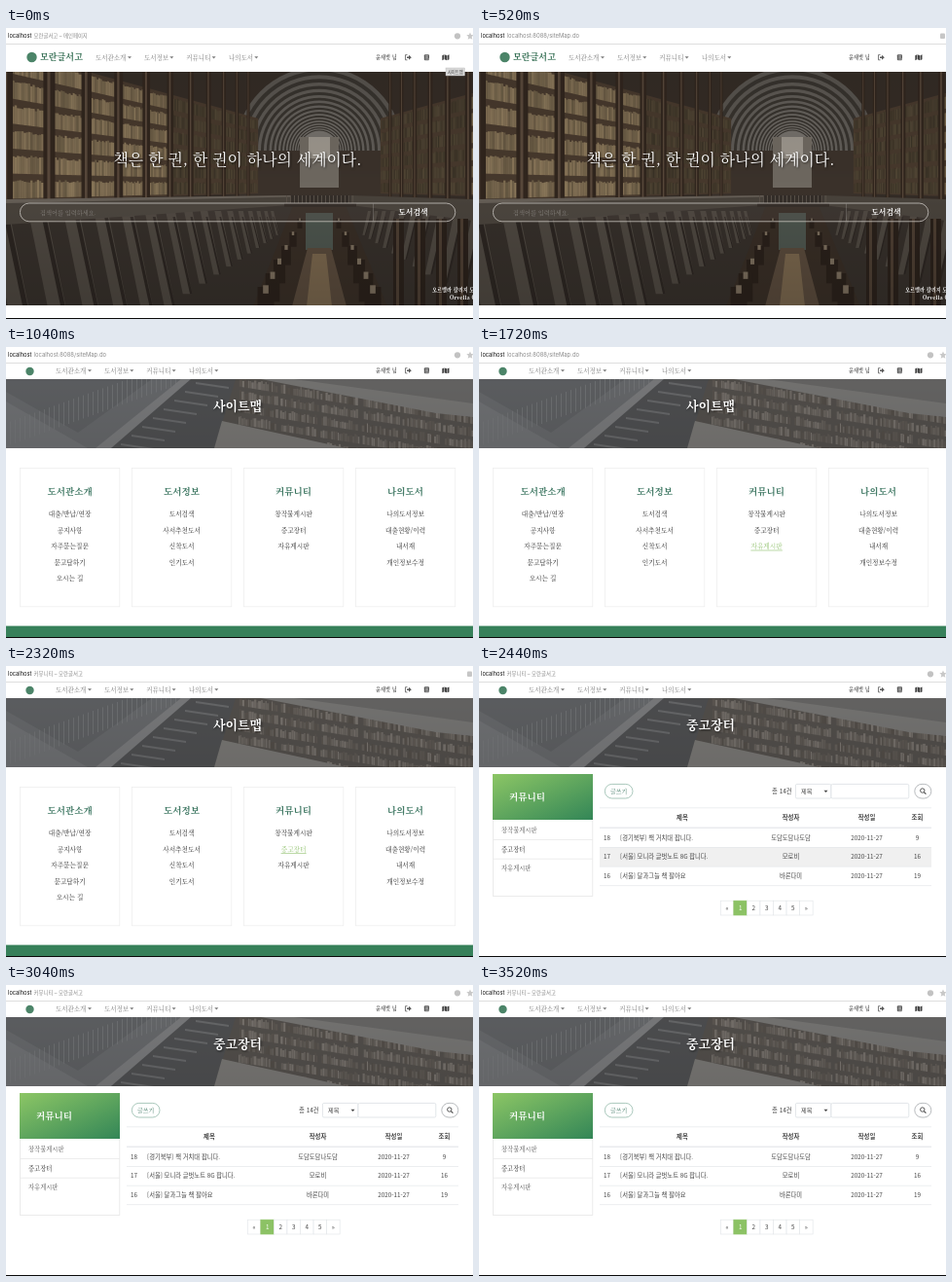
Recreate the animation shown at these times as an HTML page with a canvas. Size 480 px wide and 299 px high, loop 3640 ms.

```html
<!DOCTYPE html>
<html lang="ko">
<head>
<meta charset="utf-8">
<title>모란글서고</title>
<style>
html, body { margin: 0; width: 100%; height: 100%; overflow: hidden; background: #fff; }
#stage { position: absolute; left: 0; top: 0; width: 480px; height: 299px; overflow: hidden; background: #fff; }
#stage > * { position: absolute; left: 0; }
#hall { top: 45px; width: 480px; height: 240px; }
#hero { top: 33px; width: 480px; height: 71px; background: #606060; }
#stair { top: 33px; width: 480px; height: 71px; }
svg { top: 0; }
text { font-family: 'Noto Serif CJK KR', 'Noto Serif KR', 'Noto Serif', 'Noto Sans CJK KR', serif; fill: #2b2b2b; }
.sans { font-family: 'Noto Sans CJK KR', 'Noto Sans', sans-serif; fill: #444; }
.bar { font-family: Inter, 'Noto Sans CJK KR', sans-serif; fill: #8a8a8a; }
.host { fill: #111; }
.nav { fill: #7d7d7d; }
.name { fill: #555; }
.brand { fill: #2f6b4f; font-weight: 700; }
.white { fill: #fff; }
.big { fill: #fff; filter: drop-shadow(1px 1px 1px rgba(0, 0, 0, .6)); }
.bold { font-weight: 700; }
.mid { font-weight: 600; }
.hint { fill: #85827d; }
.green { fill: #3b7560; }
.item { fill: currentColor; }
.on { color: #2b2b2b; stroke-opacity: 0; }

/* hard switches between states */
.sw { animation: 3640ms step-end infinite; }
#hall, .home { animation-name: home; }
#hero, .inner { animation-name: inner; }
#stair { animation-name: photo; }
.map { animation-name: map; }
.board { animation-name: board; }
.url1 { animation-name: url1; }
.url2 { animation-name: url2; }
.url3 { animation-name: url3; }
.idle { animation-name: idle; }
.busy { animation-name: busy; }
.row { animation-name: row; }
.h0 { animation-name: h0; }
.h1 { animation-name: h1; }
.h2 { animation-name: h2; }
.tip { animation: tip 3640ms linear infinite; }

@keyframes home { 0% { opacity: 1 } 15.38%, 100% { opacity: 0 } }
@keyframes inner { 0% { opacity: 0 } 15.38%, 100% { opacity: 1 } }
@keyframes photo { 0% { opacity: 0 } 17.58%, 100% { opacity: 1 } }
@keyframes map { 0% { opacity: 0 } 15.38% { opacity: 1 } 67.03%, 100% { opacity: 0 } }
@keyframes board { 0% { opacity: 0 } 67.03%, 100% { opacity: 1 } }
@keyframes url1 { 0% { opacity: 1 } 12.08%, 100% { opacity: 0 } }
@keyframes url2 { 0% { opacity: 0 } 12.08% { opacity: 1 } 63.73%, 100% { opacity: 0 } }
@keyframes url3 { 0% { opacity: 0 } 63.73%, 100% { opacity: 1 } }
@keyframes idle { 0% { opacity: 1 } 12.08% { opacity: 0 } 15.38% { opacity: 1 } 63.73% { opacity: 0 } 67.03%, 100% { opacity: 1 } }
@keyframes busy { 0% { opacity: 0 } 12.08% { opacity: 1 } 15.38% { opacity: 0 } 63.73% { opacity: 1 } 67.03%, 100% { opacity: 0 } }
@keyframes row { 0% { opacity: 0 } 67.03% { opacity: 1 } 70.32%, 100% { opacity: 0 } }
@keyframes tip { 0%, 1.1% { opacity: 1 } 6.6%, 100% { opacity: 0 } }
@keyframes h0 {
  0% { color: #2b2b2b; stroke-opacity: 0 }
  25.27% { color: #8fc06c; stroke-opacity: 1 }
  26.37%, 100% { color: #2b2b2b; stroke-opacity: 0 }
}
@keyframes h1 {
  0% { color: #2b2b2b; stroke-opacity: 0 }
  26.37% { color: #8fc06c; stroke-opacity: 1 }
  27.47% { color: #2b2b2b; stroke-opacity: 0 }
  49.45%, 100% { color: #8fc06c; stroke-opacity: 1 }
}
@keyframes h2 {
  0% { color: #2b2b2b; stroke-opacity: 0 }
  27.47% { color: #8fc06c; stroke-opacity: 1 }
  28.57% { color: #2b2b2b; stroke-opacity: 0 }
  47.25% { color: #8fc06c; stroke-opacity: 1 }
  49.45%, 100% { color: #2b2b2b; stroke-opacity: 0 }
}
</style>
</head>
<body>
<div id="stage">
  <canvas id="hall" class="sw" width="960" height="480"></canvas>
  <div id="hero" class="sw"></div>
  <canvas id="stair" class="sw" width="960" height="142"></canvas>
  <svg id="ui" width="480" height="299" viewBox="0 0 480 299">
    <defs>
      <linearGradient id="leaf" x1="0" y1="0" x2="1" y2="1">
        <stop offset="0" stop-color="#8cc665"/><stop offset="1" stop-color="#338657"/>
      </linearGradient>
    </defs>
  </svg>
</div>
<script>
const ui = document.getElementById('ui');

function el(parent, tag, attrs, txt) {
  const e = document.createElementNS('http://www.w3.org/2000/svg', tag);
  for (const k in attrs) e.setAttribute(k, attrs[k]);
  if (txt) e.textContent = txt;
  return parent.appendChild(e);
}
const group = (cls, parent = ui) => el(parent, 'g', { class: cls });
const rect = (g, x, y, width, height, fill, more) => el(g, 'rect', { x, y, width, height, fill, ...more });
const path = (g, d, fill, more) => el(g, 'path', { d, fill, ...more });
// y is the middle of the line
const text = (g, x, y, s, size, cls = '', anchor = 'start') =>
  el(g, 'text', { x, y: y + size * .37, 'font-size': size, class: cls, 'text-anchor': anchor }, s);
const mid = (g, x, y, s, size, cls) => text(g, x, y, s, size, cls, 'middle');
const caret = (g, x, y, fill) => path(g, `M${x - 2} ${y - 1}h4l-2 2.2z`, fill);

function rng(seed) {
  return () => (seed = (seed * 16807) % 2147483647) / 2147483647;
}

function pen(id, top) {
  const c = document.getElementById(id).getContext('2d');
  c.scale(2, 2);
  c.translate(0, -top);
  return (fill, ...pts) => {
    c.fillStyle = fill;
    c.beginPath();
    for (let i = 0; i < pts.length; i += 2) c.lineTo(pts[i], pts[i + 1]);
    c.fill();
    return c;
  };
}

function drawHall() {
  const poly = pen('hall', 45), rand = rng(7), vx = 322;
  const box = (f, x, y, w, h) => poly(f, x, y, x + w, y, x + w, y + h, x, y + h);
  const c = box('#332b25', 0, 45, 480, 240);

  // vault: pale ribs on dark, closing in on the far window
  for (let r = 86, i = 0; r > 20; r *= .95, i++) {
    const v = i % 2 ? 50 : 82 + i;
    c.fillStyle = `rgb(${v + 4},${v},${v - 5})`;
    c.beginPath();
    c.arc(vx, 126, r, Math.PI, 0);
    c.fill();
  }
  box('#3a312a', 240, 126, 164, 50);
  box('#6d675f', 302, 112, 40, 52);
  box('#99938a', 311, 112, 22, 22);

  // receding bookcases on both sides
  const topAt = k => 110 - 88 * k, lowAt = k => 168 + 10 * k;
  for (const side of [-1, 1]) {
    const px = k => vx + side * 322 * k;
    for (let k = 1; k > .2; k *= .862) {
      const k2 = k * .862;
      poly('#46382c', px(k), topAt(k), px(k2), topAt(k2), px(k2), lowAt(k2), px(k), lowAt(k));
      for (let b = k - .02 * k; b > k2 + .015 * k;) {
        const e = b - .006 * b - .0015;
        for (let n = 0; n < 6; n++) {
          const y = q => topAt(q) + (lowAt(q) - topAt(q)) * n / 6;
          const h = (lowAt(b) - topAt(b)) / 6;
          const lit = (k > .55 ? .95 : .55) * (.8 + rand() * .3);
          const gap = h * (.14 + rand() * .12);
          poly(`rgb(${132 * lit},${114 * lit},${86 * lit})`,
            px(b), y(b) + gap, px(e), y(e) + gap, px(e), y(e) + h * .9, px(b), y(b) + h * .9);
        }
        b = e;
      }
      const w = 14 * k;
      box('#30251d', px(k) - w / 2, 45, w, lowAt(k) - 37);
      box('#57473a', px(k) - w / 6, 45, w / 4, lowAt(k) - 40);
    }
  }

  // lower storey, balusters and aisle
  poly('#342e29', 0, 178, 296, 172, 348, 172, 480, 178, 480, 286, 0, 286);
  for (let k = 1.2; k > .14; k *= .88)
    for (const side of [-1, 1]) {
      const x = vx + side * 322 * k, w = 20 * k, low = 185 + 180 * k, lean = -side * 36 * k;
      poly('#4c463f', x, 188, x + w, 188, x + w + lean, low, x + lean, low);
      poly('#2a2420', x + w * .75, 194, x + w, 194, x + w + lean, low, x + w * .75 + lean, low);
    }
  poly('#48423b', 0, 176, 292, 172, 292, 182, 0, 202);
  poly('#655e56', 0, 176, 292, 172, 292, 173.5, 0, 180);
  poly('#48423b', 480, 176, 354, 172, 354, 182, 480, 198);
  poly('#362c24', 296, 180, 348, 180, 392, 286, 254, 286);
  box('#4b534c', 308, 190, 28, 38);
  poly('#57483a', 310, 226, 334, 226, 350, 286, 294, 286);
  poly('#77644b', 315, 232, 329, 232, 335, 286, 309, 286);
  for (let i = 0; i < 6; i++) {
    const s = 5 + i * 2.4, y = 196 + i * 14;
    for (const side of [-1, 1]) {
      const x = vx + side * (20 + i * 7);
      box('#281f19', x - s / 2, y, s, s * 2);
      box('#7a6d5c', x - s / 6, y - s * .1, s / 3, s / 2);
    }
  }
  box('#2c2520', 286, 180, 74, 4);
  for (let x = 288; x < 360; x += 4) box('#574f47', x, 172, 1, 8);
  for (let x = 398; x < 480; x += 22) {
    box('#281f19', x, 196, 11, 90);
    box('#4b3d31', x + 3, 196, 3, 90);
  }
  const g = c.createLinearGradient(0, 45, 0, 286);
  g.addColorStop(0, 'rgba(20,18,16,.08)');
  g.addColorStop(.5, 'rgba(20,18,16,0)');
  g.addColorStop(1, 'rgba(20,18,16,.2)');
  box(g, 0, 45, 480, 240);
}

function drawStair() {
  const poly = pen('stair', 33), rand = rng(21);
  const c = poly('#6b6d70', 0, 33, 480, 33, 480, 104, 0, 104);
  poly('#75777a', 0, 56, 84, 104, 0, 104);
  poly('#626467', 0, 33, 150, 33, 74, 88, 0, 46);
  for (let x = 4; x < 190; x += 5) {
    const y = 102 - x * .36;
    poly('#7d7f82', x, y - 24, x + .7, y - 24, x + .7, y, x, y);
  }
  // flight of steps
  poly('#808183', 180, 33, 190, 33, 108, 104, 92, 104);
  poly('#505153', 190, 33, 250, 33, 214, 104, 108, 104);
  for (let i = 0; i < 8; i++) {
    const x = 118 + i * 11, y = 99 - i * 9;
    poly('#6c6d6f', x, y, x + 34, y + 5, x + 34, y + 7, x, y + 2);
  }
  // sloping shelves
  poly('#55514d', 236, 33, 480, 33, 480, 104, 214, 104);
  for (let n = 0; n < 6; n++)
    for (let x = 236; x < 480;) {
      const w = 1 + rand() * 1.8, y = 30 + n * 13 + (x - 236) * .16, h = 6 + rand() * 3.5, v = 78 + rand() * 46;
      if ((x - 236) % 42 > 3)
        poly(`rgb(${v + 6},${v},${v - 6})`, x, y + 10 - h, x + w, y + 10 - h, x + w, y + 10.4, x, y + 10);
      x += w + .3;
    }
  poly('#7c7b79', 262, 33, 480, 33, 480, 72, 442, 68);
  poly('#6b6a69', 296, 33, 480, 33, 480, 58);
  poly('#807e7b', 222, 76, 350, 104, 214, 104);
  const g = c.createLinearGradient(0, 33, 0, 104);
  g.addColorStop(0, 'rgba(40,40,40,.12)');
  g.addColorStop(1, 'rgba(40,40,40,.22)');
  poly(g, 0, 33, 480, 33, 480, 104, 0, 104);
}

function browserBar() {
  text(ui, 2, 8, 'localhost', 5.7, 'bar host');
  text(group('sw url1'), 28.5, 8, '모란글서고 – 메인페이지', 5.4, 'bar');
  text(group('sw url2'), 28.5, 8, 'localhost:8088/siteMap.do', 5.9, 'bar');
  text(group('sw url3'), 28.5, 8, '커뮤니티 – 모란글서고', 5.4, 'bar');
  const idle = group('sw idle');
  el(idle, 'circle', { cx: 464, cy: 8.3, r: 3.1, fill: '#c2c2c2' });
  path(idle, 'M477 4.6l1.1 2.4 2.6.3-2 1.8.6 2.6-2.3-1.3-2.3 1.3.6-2.6-2-1.8 2.6-.3z', '#c8c8c8');
  const busy = group('sw busy');
  rect(busy, 474, 5.5, 5, 5.5, '#c6c6c6', { rx: 1 });
  rect(ui, 0, 16, 480, .8, '#d6d6d6');
}

function header(g, x0, y) {
  const menu = ['도서관소개', '도서정보', '커뮤니티', '나의도서'];
  [0, 50, 93.3, 137].forEach((dx, i) => {
    text(g, x0 + dx, y, menu[i], 6.5, 'nav');
    caret(g, x0 + dx + (i ? 28.3 : 35), y, '#7d7d7d');
  });
  text(g, 380, y - .5, '윤새벗 님', 5.2, 'name mid');
  const ink = '#5a5a5a';
  path(g, `M412.5 ${y - 2.6}h-2v5.2h2`, 'none', { stroke: ink, 'stroke-width': .8 });
  path(g, `M412 ${y - .8}h2v-1.7l2.8 2.5-2.8 2.5v-1.7h-2z`, ink);
  rect(g, 429.8, y - 3, 5.2, 6, ink, { rx: 1 });
  path(g, `M431 ${y - 1.4}h3M431 ${y}h3M430.8 ${y + 1.8}h4.2`, 'none', { stroke: '#fff', 'stroke-width': .5 });
  path(g, `M448.3 ${y - 2}l2-.9v5l-2 .9zM450.8 ${y - 2.9}l2.2.9v5l-2.2-.9zM453.5 ${y - 2}l2-.9v5l-2 .9z`, '#444');
}

function homePage() {
  const g = group('sw home');
  el(g, 'circle', { cx: 26.5, cy: 30, r: 5.2, fill: '#4b8468' });
  text(g, 35, 30, '모란글서고', 9.1, 'brand');
  header(g, 92, 30.2);
  mid(g, 238, 135, '책은 한 권, 한 권이 하나의 세계이다.', 15.9, 'big');
  rect(g, 14.4, 180, 447.4, 18.8, 'rgba(90,85,80,.22)', { rx: 9.4, stroke: '#c9c6c1', 'stroke-width': .8 });
  rect(g, 377, 180.6, .6, 17.6, 'rgba(255,255,255,.3)');
  text(g, 35, 189.3, '검색어를 입력하세요.', 6.2, 'hint');
  mid(g, 418.5, 189.2, '도서검색', 7.9, 'white bold');
  text(g, 438, 269.5, '오르벨라 칼리지 도서관', 5.2, 'white mid');
  text(g, 456, 277, 'Orvella College', 5.6, 'white mid');
  const tip = group('tip', g);
  rect(tip, 452, 41, 19.5, 8, '#d9d9d9', { stroke: '#b5b5b5', 'stroke-width': .4 });
  mid(tip, 461.8, 45, '사이트맵', 4.3, 'sans');
}

function innerTop() {
  const g = group('sw inner');
  el(g, 'circle', { cx: 24.5, cy: 25, r: 4.2, fill: '#4b8468' });
  header(g, 51, 24.3);
}

function mapPage() {
  const g = group('sw map');
  mid(g, 238, 60.5, '사이트맵', 13, 'big mid');
  const cols = [
    ['도서관소개', '대출/반납/연장', '공지사항', '자주묻는질문', '묻고답하기', '오시는 길'],
    ['도서정보', '도서검색', '사서추천도서', '신착도서', '인기도서'],
    ['커뮤니티', '창작물게시판', '중고장터', '자유게시판'],
    ['나의도서', '나의도서정보', '대출현황/이력', '내서재', '개인정보수정']
  ];
  cols.forEach(([head, ...items], i) => {
    const x = 65.6 + i * 115;
    rect(g, x - 51.2, 124.4, 102.4, 142.4, 'none', { stroke: '#eee', 'stroke-width': .8 });
    mid(g, x, 148.2, head, 9.6, 'green mid');
    items.forEach((s, n) => {
      const y = 172 + n * 16.5;
      const link = group(i == 2 ? 'on sw h' + n : 'on', g);
      mid(link, x, y, s, 6.7, 'item');
      if (i == 2) {
        const half = s.length * 3.25;
        path(link, `M${x - half} ${y + 4}h${half * 2}`, 'none', { stroke: '#8fc06c', 'stroke-width': .6 });
      }
    });
  });
  rect(g, 0, 286.6, 480, 12.4, '#37805a');
}

function boardPage() {
  const g = group('sw board'), line = '#e4e7ea';
  mid(g, 238, 60.5, '중고장터', 13, 'big mid');

  rect(g, 14.4, 111.4, 102.4, 125, '#fff', { stroke: '#e6e6e6', 'stroke-width': .8 });
  rect(g, 14, 111, 103, 47, 'url(#leaf)');
  text(g, 31, 134, '커뮤니티', 9.6, 'white mid');
  ['창작물게시판', '중고장터', '자유게시판'].forEach((s, i) => {
    text(g, 23, 168.5 + i * 19.7, s, 6.3, i == 1 ? '' : 'name');
    if (i) rect(g, 14.4, 158.4 + i * 19.7, 102.4, .7, '#e6e6e6');
  });

  const field = (x, w, stroke, rx) => rect(g, x, 121.4, w, 14.6, '#fff', { rx, stroke, 'stroke-width': .7 });
  field(129.4, 28.6, '#86b09f', 7.3);
  mid(g, 143.7, 128.7, '글쓰기', 6, 'green');
  text(g, 301, 128.7, '총 14건', 6.4, 'sans');
  field(325.4, 36.6, '#d6dbe0', 1.5);
  text(g, 331, 128.7, '제목', 6.2, 'sans');
  caret(g, 356.5, 128.7, '#444');
  field(362, 79.8, '#d6dbe0', 1.5);
  field(447.8, 17, '#9a9ea2', 7.3);
  el(g, 'circle', { cx: 455.8, cy: 128, r: 2.2, fill: 'none', stroke: '#444', 'stroke-width': .9 });
  path(g, 'M457.4 129.6l2 2', 'none', { stroke: '#444', 'stroke-width': 1.1 });

  rect(group('sw row', g), 124, 186, 341, 20, '#f0f0f0');
  [145.5, 165.6, 186, 205.8, 225.4].forEach((y, i) => rect(g, 124, y, 341, i == 1 ? 1.2 : .7, line));
  const xs = [131.5, 145, 320.5, 398.5, 450.5];
  ['제목', '작성자', '작성일', '조회'].forEach((s, i) => mid(g, i ? xs[i + 1] : 209, 156, s, 6.4, 'sans bold'));
  [
    ['18', '[경기북부] 책 거치대 팝니다.', '도담도담나도담', '2020-11-27', '9'],
    ['17', '[서울] 모니라 글벗노트 8G 팝니다.', '모로비', '2020-11-27', '16'],
    ['16', '[서울] 달과그늘 책 팔아요', '바론다미', '2020-11-27', '19']
  ].forEach((r, n) => r.forEach((s, i) =>
    text(g, xs[i], 176.2 + n * 19.7, s, 6.3, 'sans', i == 1 ? 'start' : 'middle')));

  const w = 13.55;
  ['«', '1', '2', '3', '4', '5', '»'].forEach((s, i) => {
    const x = 248.3 + i * w, on = i == 1;
    rect(g, x, 241.2, w, 14.8, on ? '#8cc265' : '#fff', { stroke: on ? '#8cc265' : line, 'stroke-width': .7 });
    mid(g, x + w / 2, 248.6, s, 6.3, on ? 'sans white' : 'sans');
  });
}

drawHall();
drawStair();
browserBar();
homePage();
innerTop();
mapPage();
boardPage();
rect(ui, 0, 298, 480, 1, '#0a0a0a');
</script>
</body>
</html>
```
